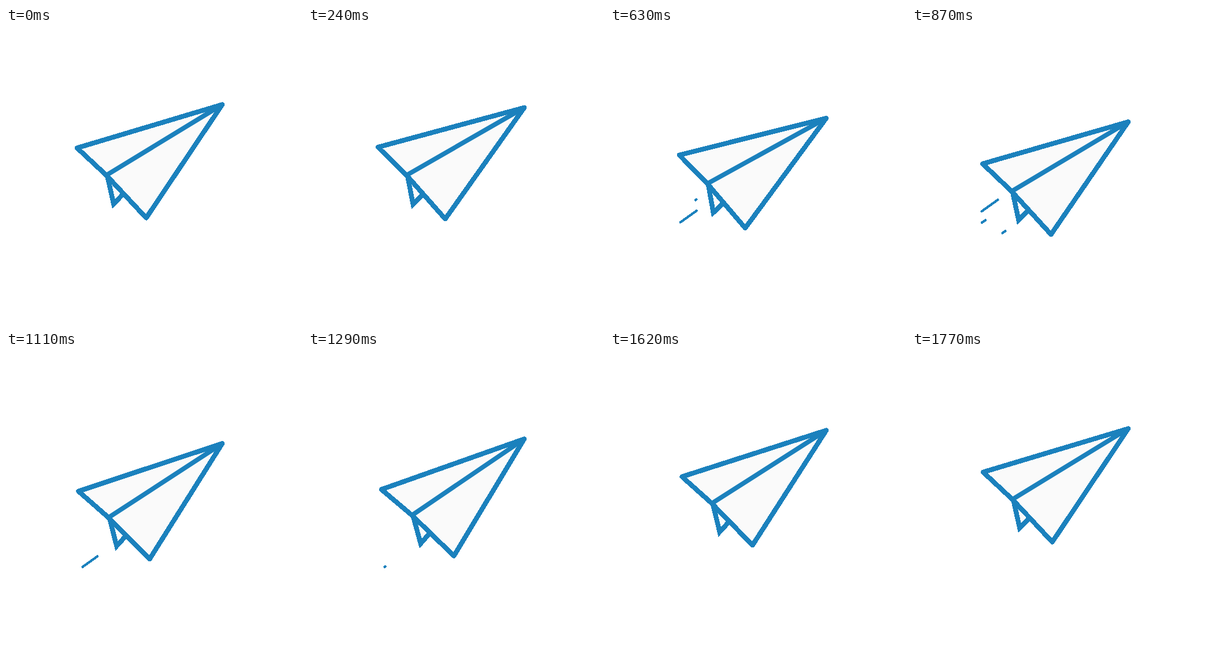
Animation of 512x512 px, one loop 1800 ms. Source, as an HTML page:

```html
<!DOCTYPE html>
<html lang="en">
<head>
<meta charset="utf-8">
<title>Paper plane</title>
<style>
  html, body { margin: 0; width: 100%; height: 100%; overflow: hidden; background: #fff; }
  svg { display: block; width: 100%; height: 100%; }
  path { fill: #fafafa; stroke: #1b81bd; stroke-width: 8.4; shape-rendering: crispEdges; }
  .round { stroke-linejoin: round; stroke-linecap: round; }
  .fold { stroke-width: 8; shape-rendering: auto; }
  .dash { stroke-width: 4.2; fill: none; }
</style>
</head>
<body>
<svg viewBox="0 0 512 512">
  <!-- The nose is the origin -->
  <g id="plane">
    <path d="M-199 122L-187.8 171.8L-164 147"/>
    <path class="round" d="M0 0L-251 75L-200.4 122.2L-131.5 196Z"/>
    <path class="round fold" d="M0 0L-200.4 122.2"/>
  </g>
  <path class="round dash"/>
  <path class="round dash"/>
  <path class="round dash"/>
</svg>
<script>
  const LOOP = 1800;
  const plane = document.getElementById('plane');
  const dashes = document.querySelectorAll('.dash');
  const dashStarts = [
    { x: 150, y: 316, at: 440 },
    { x: 149.5, y: 296.5, at: 600 },
    { x: 161.5, y: 351, at: 815 }
  ];

  // Eased progress from 0 to 1 between two times
  function ease(t, from, to) {
    const p = Math.min(1, Math.max(0, (t - from) / (to - from)));
    return p * p * (3 - 2 * p);
  }

  function drawDash(path, { x, y, at }, t) {
    const head = ease(t, at, at + 210);
    const tail = ease(t, at + 240, at + 510);
    const point = k => `${x - 29 * k} ${y + 20.7 * k}`;
    path.setAttribute('d', head > tail ? `M${point(tail)}L${point(head)}` : '');
  }

  function draw(now) {
    const t = now % LOOP;
    const y = 132.5 + 30 * (ease(t, 0, 900) - ease(t, 900, LOOP));
    const angle = 3 * ease(t, 0, 480) - 6 * ease(t, 480, 1380) + 3 * ease(t, 1380, LOOP);
    plane.setAttribute('transform', `translate(374 ${y}) rotate(${angle})`);
    dashes.forEach((path, i) => drawDash(path, dashStarts[i], t));
  }

  const start = performance.now();
  function tick() {
    draw(performance.now() - start);
    requestAnimationFrame(tick);
  }
  tick();
</script>
</body>
</html>
```
